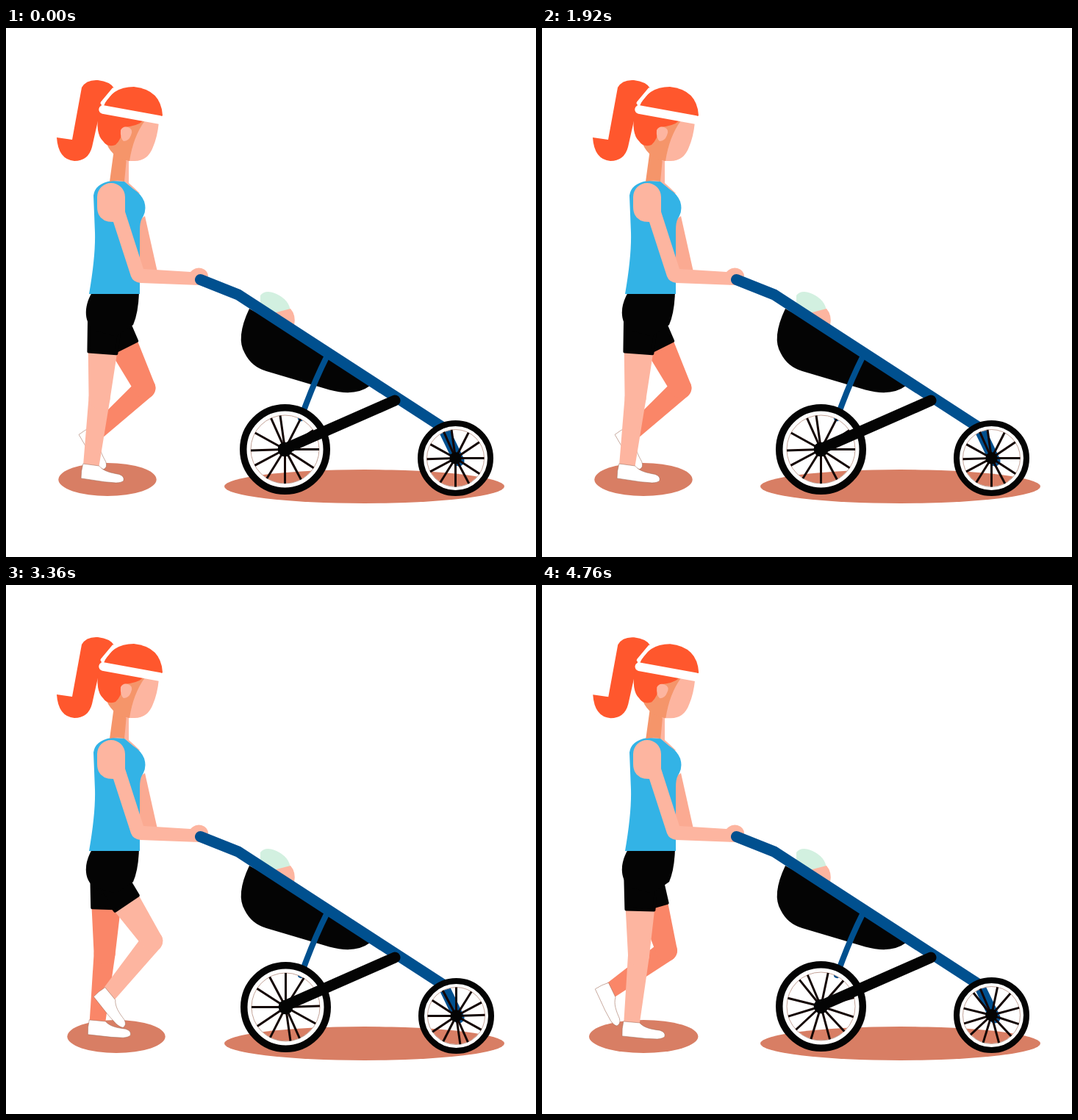
Write an HTML page that moves like this. It is 721 by 720 pixels and loops after 4800 ms.

```html
<!DOCTYPE html>
<html lang="en">
<head>
<meta charset="utf-8">
<title>Walk with a stroller</title>
<style>
html, body { margin: 0; width: 100%; height: 100%; overflow: hidden; background: #fff; }
svg { display: block; width: 100vw; height: 100vh; }
.skin { fill: #fdb5a0; }
.deep { fill: #fa8668; }
.hair { fill: #ff572d; }
.black { fill: #040404; }
.ground { fill: #d87e64; }
.shoe { fill: #fff; stroke: #9a6552; stroke-width: .5; }
.shorts { fill: #040404; stroke: #040404; stroke-width: 4; stroke-linejoin: round; }
.line { fill: none; stroke-linecap: round; stroke-linejoin: round; }
.blue { stroke: #00508f; }
</style>
</head>
<body>
<svg viewBox="0 0 721 720" preserveAspectRatio="none">
  <defs>
    <path id="thigh" d="M-20 48H20L14.5 114A14.5 14.5 0 0 1 -14.5 114Z"/>
    <path id="shin" d="M-14.5 0A14.5 14.5 0 0 1 14.5 0L10.5 99H-10.5Z"/>
    <path id="shoe" d="M-11 -6L11 -5C18 2 28 3 39 4Q47 6 46 12Q44 15 36 16H20L-12 14Q-13 4 -11 -6Z"/>
    <path id="leg" d="M-22 -2Q0 -20 22 -2L19 52H-19Z"/>
  </defs>

  <ellipse id="shade" class="ground" cy="614.5" ry="22.5"/>
  <ellipse class="ground" cx="487.5" cy="624" rx="190.5" ry="23"/>

  <g id="far"></g>
  <g id="near"></g>
  <path class="black" d="M117 360H181Q180 388 173 404L150 420L121 412C106 402 105 380 117 360Z"/>

  <!-- upper body -->
  <path fill="#fbaa92" d="M180 262L189 256L206 332H185L181 318Z"/>
  <path class="skin" d="M160 176H167V211Q174 217 182 225L170 232L140 214Z"/>
  <path fill="#33b3e6" d="M119 228Q121 212 143 208L161 209L173 219Q184 226 188 236Q192 249 185 259Q182 264 182 276V362H113Q122 310 121 278Z"/>
  <path class="skin" d="M124 230A19 19 0 0 1 162 230V250L187 328L251 332Q257 325 266 327Q275 330 275 338L262 350L183 347Q173 346 170 338L146 264Q124 264 124 243Z"/>

  <g id="head">
    <path fill="#f5956a" d="M147 165L141 209Q152 206 161 209L164 178Z"/>
    <path class="hair" d="M103 81Q109 70 125 71Q142 73 147 82L130 104L117 162Q112 181 93 181Q71 179 69 149L90 152Z"/>
    <path class="skin" d="M160 124L208 128Q206 148 200 162Q193 181 175 181H163Z"/>
    <path fill="#f5956a" d="M150 126L189 126Q173 148 168 181Q146 178 137 158Z"/>
    <path class="hair" d="M126 112L187 126Q178 134 160 135Q157 152 149 159Q138 163 132 154Q121 144 126 112Z"/>
    <path class="skin" d="M156 139Q159 133 166 135Q174 138 170 146Q167 154 160 154Q155 150 156 139Z"/>
    <path class="hair" d="M132 108Q143 80 174 80Q211 84 213 119L208 124Z"/>
    <path class="line" stroke="#fff" stroke-width="5" d="M131 102L146 84"/>
    <path class="line" stroke="#fff" stroke-width="11.5" d="M132 111L209 125"/>
  </g>

  <!-- stroller -->
  <path fill="#d2f0e0" d="M346 380V364Q353 355 368 362Q385 370 387 385L365 392Z"/>
  <path class="skin" d="M364 388L387 382Q395 391 392 405Z"/>
  <path class="black" d="M331 382Q312 422 325 443Q334 461 354 467L440 492.500Q475 502 495 487L420 430Z"/>
  <path class="line blue" stroke-width="8" d="M436 448Q420 480 406 518L401 531"/>
  <path class="line blue" stroke-width="15" d="M264.500 342.500L316 363L594 543.500L616 589"/>
  <g id="wheels" fill="none"></g>
  <path class="line" stroke="#040404" stroke-width="15" d="M379 573L529 507"/>
</svg>
<script>
const FRAME = 40, CYCLE = 24, THIGH = 114, SHIN = 97;
const $ = id => document.getElementById(id);
const rad = Math.PI / 180;

// thigh, shin and foot angle, one pose every two steps of the cycle
const poses = [
  [-4, -7, 5], [-9, -12, 6], [-14, -19, 12], [-16, -31, 32],
  [-6, -55, 62], [15, -55, 62], [34, -39, 48], [39, -18, 15],
  [31, 0, -8], [21, 2, -5], [10, -2, -1], [1, -5, 0]
];
const spokes = [0, 33, 62, 90, 122, 152, 178, 209, 246, 262, 297, 326];

function add(parent, tag, attrs) {
  const el = document.createElementNS("http://www.w3.org/2000/svg", tag);
  for (const key in attrs) el.setAttribute(key, attrs[key]);
  return parent.appendChild(el);
}

function makeLeg(id, x, y, skin, lag) {
  const part = (name, cls) => add($(id), "use", { href: "#" + name, class: cls });
  return {
    x, y, lag,
    shin: part("shin", skin), shoe: part("shoe", "shoe"),
    thigh: part("thigh", skin), shorts: part("leg", "shorts")
  };
}

function makeWheel(x, y, r, tire, rim) {
  const g = add($("wheels"), "g", {});
  const inner = r - tire - rim;
  add(g, "circle", { r: inner + rim / 2, stroke: "#fff", "stroke-width": rim + 1 });
  add(g, "circle", { r: r - tire / 2, stroke: "#040404", "stroke-width": tire });
  add(g, "circle", { r: inner, stroke: "#9a6552", "stroke-width": .6 });
  const spin = add(g, "g", { stroke: "#140604", "stroke-width": 3 });
  for (const a of spokes)
    add(spin, "line", { x2: inner * Math.cos(a * rad), y2: inner * Math.sin(a * rad) });
  add(g, "circle", { r: r * .16, fill: "#040404" });
  return { x, y, g, spin };
}

const legs = [
  makeLeg("far", 138, 388, "deep", 11.1),
  makeLeg("near", 135, 390, "skin", 0)
];
const wheels = [
  makeWheel(379.5, 573.5, 61.5, 9.5, 5.5),
  makeWheel(611.5, 585.5, 51.5, 8, 4.5)
];

// Smooth periodic curve through the poses
function poseAt(step) {
  const u = (step % CYCLE) / 2, i = Math.floor(u), k = u - i, n = poses.length;
  const at = j => poses[(i + j + n) % n];
  return [0, 1, 2].map(c => {
    const a = at(-1)[c], b = at(0)[c], d = at(1)[c], e = at(2)[c];
    return b + k / 2 * (d - a + k * (2 * a - 5 * b + 4 * d - e + k * (3 * (b - d) + e - a)));
  });
}

function place(el, x, y, turn) {
  el.setAttribute("transform", `translate(${x.toFixed(2)} ${y.toFixed(2)}) rotate(${turn.toFixed(2)})`);
}

function poseLeg(leg, step) {
  const [thigh, shin, foot] = poseAt(step + leg.lag);
  const kx = leg.x + THIGH * Math.sin(thigh * rad), ky = leg.y + THIGH * Math.cos(thigh * rad);
  const ax = kx + SHIN * Math.sin(shin * rad), ay = ky + SHIN * Math.cos(shin * rad);
  place(leg.thigh, leg.x, leg.y, -thigh);
  place(leg.shorts, leg.x, leg.y, -thigh);
  place(leg.shin, kx, ky, -shin);
  place(leg.shoe, ax, ay, foot);
}

function draw(ms) {
  const step = Math.floor(ms / FRAME) % CYCLE;
  const turn = step / CYCLE * 2 * Math.PI;
  legs.forEach(leg => poseLeg(leg, step));

  const stride = Math.abs(Math.sin(turn - .05 * Math.PI));
  $("shade").setAttribute("cx", 144 - 6 * Math.cos(turn));
  $("shade").setAttribute("rx", 62 + 30 * stride);

  const bob = Math.abs(Math.sin(turn));
  place($("head"), bob, bob, 0);

  const wobble = (1 - Math.cos(turn)) / 2;
  for (const w of wheels) {
    place(w.g, w.x + wobble, w.y + wobble, 0);
    place(w.spin, 0, 0, step * 360 / CYCLE);
  }
}

const start = performance.now();
function tick() {
  draw(performance.now() - start);
  requestAnimationFrame(tick);
}
draw(0);
requestAnimationFrame(tick);
</script>
</body>
</html>
```
